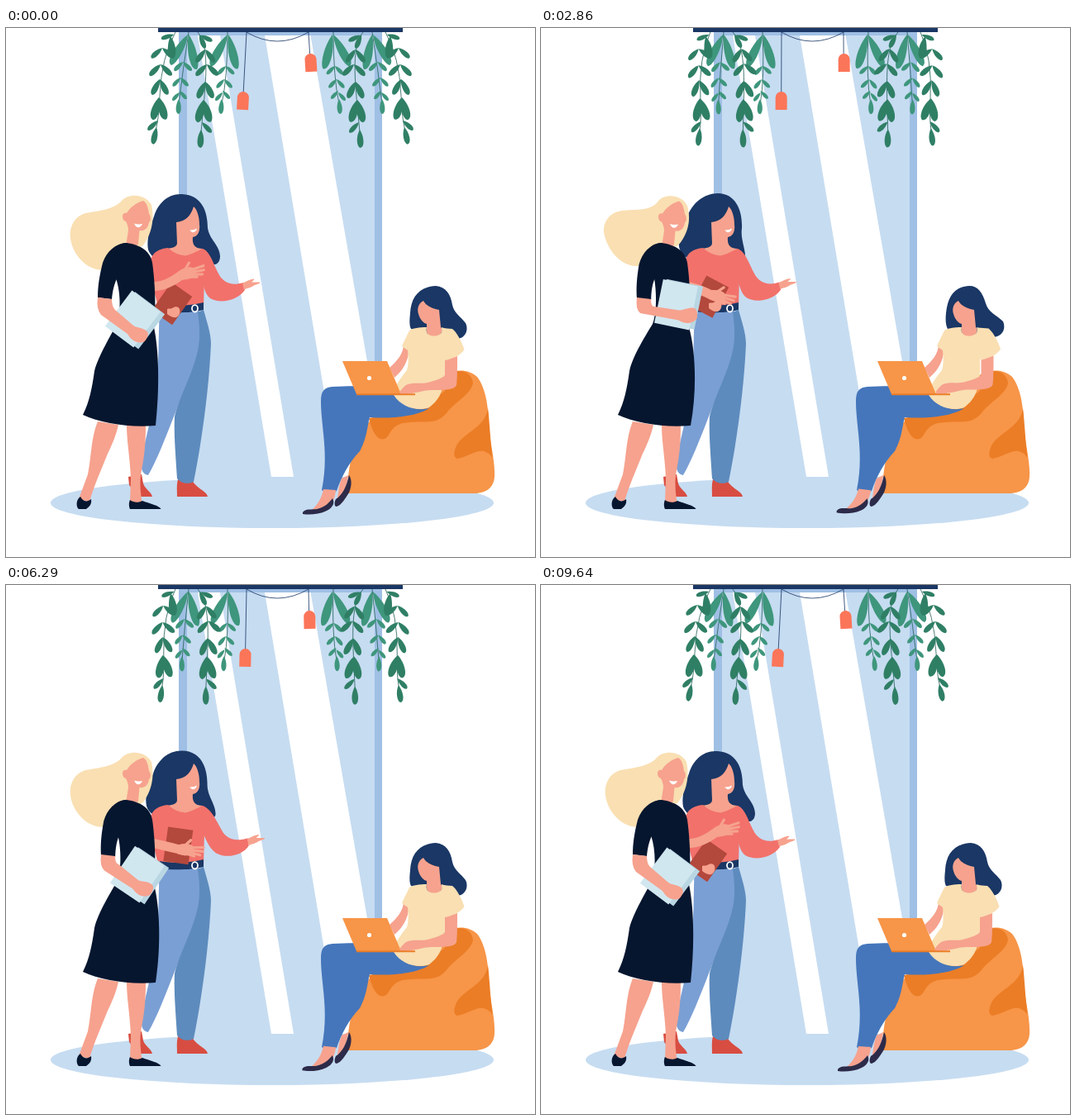
Animation, 640 px wide and 640 px high, one loop 9.71 s. Source, as an HTML page:

```html
<!DOCTYPE html>
<html lang="en">
<head>
<meta charset="utf-8">
<title>Office talk</title>
<style>
html, body { margin: 0; width: 100%; height: 100%; overflow: hidden; background: #fff; }
svg { display: block; width: 100%; height: 100%; }
.skin { fill: #f6a28e; }
.navy { fill: #1a3765; }
.dark { fill: #06162f; }
.cream { fill: #f9dfb2; }
.coral { fill: #f2716b; }
.orange { fill: #f79548; }
.amber { fill: #eb7d26; }
.red { fill: #d84d41; }
.cord { fill: none; stroke: #1a3765; stroke-width: .8; }
.fingers { fill: none; stroke: #f6a28e; stroke-width: 3.2; stroke-linecap: round; }
</style>
</head>
<body>
<svg viewBox="0 0 640 640">
  <ellipse cx="322" cy="574.5" rx="268" ry="30.5" fill="#c6dcf1"/>

  <!-- window -->
  <path fill="#9fbfe4" d="M209 5H455V543H209Z"/>
  <path fill="#c6dcf1" d="M219 9H446V546H219Z"/>
  <path fill="#fff" d="M232 9H259L348 543H321ZM313 9H368.500L446 455V543H402Z"/>

  <!-- hanging decor -->
  <path class="cord" d="M291 5Q328 27 366 5"/>
  <g id="tagA"><path class="cord" d="M291 5V78"/><path fill="#fb7559" d="M284 99V84A7 7 0 0 1 298 84V99Z"/></g>
  <g id="tagB"><path class="cord" d="M366 5V32"/><path fill="#fb7559" d="M359.500 53V38A7 7 0 0 1 373.500 38V53Z"/></g>
  <g class="vines"></g>
  <g class="vines" transform="matrix(-1 0 0 1 664 0)"></g>
  <path class="navy" d="M184 0H480V5H184Z"/>

  <!-- guide -->
  <path class="navy" id="guideHair"/>
  <path class="red" d="M164 540L166 551C168 558 176 561 177 567H160L149 553L148 543Z"/>
  <path class="red" d="M208 546C206 553 207 560 207 567H244C243 560 231 558 225 547Z"/>
  <path fill="#7a9fd4" d="M186 340L236 343C239 375 234 400 222 425C207 455 190 510 172 541C166 540 162 535 164 520L180 450C186 410 184 370 186 340Z"/>
  <path fill="#5d8bbd" d="M232 344L239 341C243 355 248 370 248 382C246 430 238 495 227 549C219 553 211 550 207 545C205 515 203 490 204 470C210 445 228 415 233 385C235 370 234 358 232 344Z"/>
  <path class="skin" d="M227 216C224 226 218 234 206 235L207 260C207 264 203 266 195 267C205 278 226 280 238 267C229 267 225 263 226 253C232 252 235 246 234 238C234 228 231 219 227 216Z"/>
  <path fill="#fff" d="M222 244.500Q227 245 231 242.500Q229.500 248 225 247Z"/>
  <path class="coral" d="M196 266C206 275 211 274 217 275.500C224 274 232 270 237 267C243 269 245 272 246 277L240 300L239 338H184L176 305L174 283C177 271 185 267 196 266Z"/>
  <path class="coral" id="guideSleeve"/>
  <path class="skin" id="guidePalm" d="M-1 -4C3 -5 6 -8 13 -9C14 -8 12 -7 10 -5L20 -5C22 -4 16 -2 13 -1C9 2 5 2 1 4Z"/>
  <path class="navy" d="M186 334C200 337 225 336 239 332V341C225 345 200 345 186 343Z"/>
  <ellipse cx="228.500" cy="339.300" rx="3.500" ry="4.200" fill="#1a3765" stroke="#fff" stroke-width="1.8"/>
  <path id="redBook" fill="#b3483c" d="M-15 0H15.500V42H-15Z"/>
  <path class="skin" id="grip" d="M-8 -4C-6 -5 -4 -4 -2 -5C2 -8 6 -7 7 -4C8 0 7 4 3 6C-2 7 -5 4 -8 2Z"/>
  <path id="guideArm" fill="none" stroke="#f6a28e" stroke-width="11"/>
  <g id="guideHand">
    <path class="skin" d="M-2 -5.500C6 -8 12 -8 16 -5L18 4C12 8 6 7 -2 5.500Z"/>
    <path class="fingers" d="M5 -4L13 -12M14 -3L29 -4M14 0L28 1M14 3L25 5.500M10 5L18 7"/>
  </g>

  <!-- visitor -->
  <path class="cream" id="visitorHair"/>
  <g id="visitorFace">
    <path class="skin" d="M166 209C158 211 150 217 146 224C140 222 139 232 145 234C147 238 148 241 148 245L145 264C150 268 158 267 160 261L161.500 245C168 246 172 242 173 235C176 233 175 226 173 225C172 217 170 211 166 209Z"/>
    <path fill="#fff" d="M155 236.500Q160 238 165 237Q163 242 158.500 241Q156 239.500 155 236.500Z"/>
  </g>
  <path class="skin" d="M111 476C103 495 103 520 99 540L88 570L101 573C106 555 115 535 123 515C129 503 134 490 136 480Z"/>
  <path class="skin" d="M146 480C146 500 150 520 151 545L150 574L165 576C163 565 161 550 164 535C168 515 169 500 169 480Z"/>
  <path class="dark" d="M90 567C84 571 85 580 88 582H97C101 579 104 576 103 570C98 574 93 573 90 567Z"/>
  <path class="dark" d="M150 571C148 575 149 580 150 582H187.500C186 578 173 575 165 572C160 575 154 574 150 571Z"/>
  <path class="dark" id="dress"/>
  <path class="dark" id="visitorSleeve" d="M146 260C132 261 122 270 117 284C113 300 111 312 111 326L128 328C129 318 131 308 136 300L152 278Z"/>
  <g id="files">
    <path fill="#b9d6e3" d="M-19 -28H26V25H-19Z"/>
    <path fill="#d1e7ef" d="M-23 -27H20V27H-23Z"/>
  </g>
  <path class="skin" id="visitorArm"/>
  <path class="skin" id="visitorHand" d="M-3 -6C4 -8 8 -12 14 -11C18 -10 19 -5 19 0C17 5 12 8 6 8C2 8 0 7 -3 6Z"/>

  <!-- seated worker -->
  <path class="orange" d="M414 563C412 540 418 510 430 490C445 460 490 440 530 420C545 412 560 413 570 422C581 436 584 462 584 480C586 505 592 525 591 543C590 557 580 563 566 563Z"/>
  <path class="amber" d="M439 472C442 485 448 498 456 497.500C466 496 462 483 480 478C510 474 522 482 536 462C550 448 562 442 565 430C564 417 552 413 543 416L530 440L500 460Z"/>
  <path class="amber" d="M583 460C580 485 550 490 544 508C541 515 542 520 546 521C555 520 570 510 578 512C584 514 587 517 588.500 520C586 500 585 475 583 460Z"/>
  <path class="navy" id="workerHair"/>
  <path class="skin" d="M481 384C480 395 473 403 464 411L470 423C480 414 486 405 488 388Z"/>
  <path class="skin" d="M505 330C499 333 497 340 499 346C501 353 505 357 509 358L509 364C508 370 512 374 519 374C526 373 530 366 526 362L524 341C516 340 508 336 505 330Z"/>
  <path class="cream" d="M509 362C500 362 492 363 488 366C484 374 481 380 479 385L486 390C487 400 487 408 485 414C476 425 470 435 466 444C476 460 500 464 512 459C528 448 532 430 531 402L544 368L527 362C530 370 523 373 517 372.500C509 372 508 368 509 362Z"/>
  <path fill="#4576bb" d="M469 444C460 433 430 432 395 434C384 435 381 440 381 452C381 482 391 515 382 559C387 563 395 563 400 560C405 545 415 525 428 512C437 495 437 482 440 471C465 473 498 470 512 460C495 464 478 458 469 444Z"/>
  <path class="skin" d="M406 545L414 541C413 552 409 562 404 570L400 574C402 565 402 555 406 545Z"/>
  <path fill="#2c2b49" d="M415 541C418 545 419 553 415 562C410 570 406 577 400 579C397 579 397 574 399 570C407 565 412 555 415 541Z"/>
  <g id="foot">
    <path class="skin" d="M384 558L399 559C398 570 394 577 390 579L369 584C378 576 382 568 384 558Z"/>
    <path fill="#2c2b49" d="M359 586C362 581 370 583 376 582C386 580 391 574 395 569C398 574 396 580 388 584C378 589 366 589 359 588Z"/>
  </g>
  <path class="orange" d="M407 403H461L478 443H424Z"/>
  <circle cx="439.500" cy="423.500" r="2.600" fill="#fff"/>
  <g id="workerArm">
    <path class="skin" d="M531 400L546 397C546 412 546 425 545 432C543 438 530 438 515 438C505 438 495 443 478 443C474 442 478 437 484 432C492 428 500 431 510 429C520 426 528 424 531 420Z"/>
    <path class="cream" d="M527 363L540 364C546 369 551 379 554.500 389C550 396 541 400 531 402Z"/>
  </g>
  <path class="amber" d="M424 442.300H495V444.300H424Z"/>
</svg>
<script>
const LOOP = 9710;
const KEYS = [0, 1430, 2860, 4860, 6290, 7290];
const $ = id => document.getElementById(id);
const set = (id, d) => $(id).setAttribute('d', d);
const move = (id, x, y, a = 0) =>
  $(id).setAttribute('transform', `translate(${x} ${y}) rotate(${a})`);
const spin = (el, a, x, y) => el.setAttribute('transform', `rotate(${a} ${x} ${y})`);

// Periodic monotone curve through one value per key time.
function track(...v) {
  const n = KEYS.length;
  const time = i => KEYS[(i + n) % n] + LOOP * Math.floor(i / n);
  const val = i => v[(i + n) % n];
  const rate = i => (val(i + 1) - val(i)) / (time(i + 1) - time(i));
  const slope = i => {
    const a = rate(i - 1), b = rate(i);
    return a * b > 0 ? 2 * a * b / (a + b) : 0;
  };
  return t => {
    let i = n - 1;
    while (KEYS[i] > t) i--;
    const h = time(i + 1) - time(i), u = (t - time(i)) / h;
    const s = u * u * (3 - 2 * u);
    return val(i) * (1 - s) + val(i + 1) * s +
      h * u * (1 - u) * (slope(i) * (1 - u) - slope(i + 1) * u);
  };
}

// Blend two paths of equal structure.
function blend(a, b) {
  const num = /-?\d+(\.\d+)?/g, to = b.match(num).map(Number);
  return k => {
    let i = 0;
    return a.replace(num, x => (+x + (to[i++] - x) * k).toFixed(2));
  };
}

// Vines: nodes are drooping pairs [x, y, length, spread], leaves are [x, y, length, angle].
const DARK = '#2f7f65', LIGHT = '#3e967c';
const VINES = [
  { x: 221, sway: 4, color: LIGHT, stem: 'M221 5Q214 50 209 92',
    nodes: [[214, 41, 15, 45], [211, 60, 14, 42]],
    leaves: [[220, 8, 42, 121], [221, 8, 43, 79], [210, 78, 13, 132], [210, 76, 13, 50], [209, 86, 18, 92]] },
  { x: 268, sway: 3, color: LIGHT, stem: 'M268 5Q268 60 261 92',
    nodes: [[266, 46, 14, 45], [264, 62, 14, 42]],
    leaves: [[268, 8, 43, 119], [269, 8, 43, 77], [262, 78, 13, 132], [262, 76, 13, 48], [261, 86, 18, 94]] },
  { x: 204, sway: 5.5, color: DARK, stem: 'M205 5Q188 35 186 82Q185 110 181 124',
    nodes: [[189, 24, 18, 48], [187, 44, 19, 45], [186, 62, 21, 27], [185, 84, 28, 16]],
    leaves: [[203, 8, 16, 163], [199, 10, 27, 85], [184, 112, 17, 138], [182, 120, 21, 102]] },
  { x: 232, sway: 4.3, color: DARK, stem: 'M232 5C248 25 241 70 236 126',
    nodes: [[241, 26, 19, 36], [243, 44, 19, 45], [241, 65, 22, 25], [239, 87, 28, 16]],
    leaves: [[234, 8, 18, 68], [235, 9, 16, 25], [237, 114, 17, 48], [236, 123, 22, 93]] }
];

function leaf([x, y, len, angle]) {
  const w = len > 35 ? .16 : .23;
  const p = (a, b) => `${(a * len).toFixed(1)} ${(b * len).toFixed(1)}`;
  return `<path transform="translate(${x} ${y}) rotate(${angle})" d="M0 0C${p(.35, -w)} ${p(.9, -w)} ${p(1, -.04)}C${p(1, w)} ${p(.4, w)} 0 0Z"/>`;
}

function vine(v) {
  const pairs = v.nodes.flatMap(([x, y, len, s]) => [[x, y, len, 90 + s], [x, y, len, 90 - s]]);
  return `<g fill="${v.color}"><path d="${v.stem}" fill="none" stroke="#245f58" stroke-width=".8"/>` +
    pairs.concat(v.leaves).map(leaf).join('') + '</g>';
}

const groups = [...document.querySelectorAll('.vines')];
groups.forEach(g => g.innerHTML = VINES.map(vine).join(''));

const shapes = {
  guideHair: blend(
    'M213 201C196 200 184 212 179 228C173 243 170 258 172 268C174 274 178 278 184 279L236 270C243 289 259 291 259 276C258 262 246 256 244 242C244 222 237 202 213 201Z',
    'M214 200C197 200 183 212 177 228C170 242 164 257 168 268C171 276 176 279 184 279L236 268C242 272 246 277 247 279C248 268 241 256 243 242C244 222 236 200 214 200Z'),
  guideSleeve: blend(
    'M238 267C248 272 250 284 257 297C262 307 272 313 287 308L289 317C280 330 259 334 247 327C240 322 239 310 236 300Z',
    'M238 267C250 272 256 284 264 297C269 306 280 310 296 305L297 314C290 326 270 330 258 322C248 314 243 305 236 290Z'),
  visitorHair: blend(
    'M176 214C168 200 148 200 140 209C130 220 112 221 96 224C82 228 76 242 78 255C81 275 98 294 120 293C130 292 140 280 146 270L165 264C176 250 180 232 176 214Z',
    'M177 215C170 201 150 200 142 209C134 222 114 219 98 221C82 223 75 236 76 247C78 262 92 287 115 288C132 288 140 275 148 268L165 264C178 250 182 232 177 215Z'),
  dress: blend(
    'M146 260C162 262 175 270 177 284C180 305 182 340 179 362C185 390 186 435 181 481C150 484 115 478 93 468C101 452 104 436 107 415C112 396 128 370 134 358C139 345 139 320 133 303L124 280C128 264 138 260 146 260Z',
    'M146 260C162 262 175 270 177 284C180 305 182 340 179 362C187 390 189 438 181 481C150 484 115 478 93 468C101 452 104 436 107 415C111 396 128 370 135 358C140 345 140 320 137 303L126 280C128 264 138 260 146 260Z'),
  workerHair: blend(
    'M520 312C500 313 490 325 489 345C488 355 488 360 490 364L520 374L546 376C556 375 560 365 556 357C550 349 542 345 540 335C538 322 532 313 520 312Z',
    'M518 312C500 313 492 325 490 345C489 355 490 360 492 364L520 372L546 374C558 374 563 364 559 355C551 347 541 344 538 333C534 320 529 312 518 312Z')
};

const pose = {
  guideHair: track(0, .12, 1, 1, .45, 1),
  reach: track(0, 0, .15, 1, .6, .06),
  redX: track(212.5, 212, 213.5, 206, 211, 212.5),
  redY: track(316, 312.5, 306.5, 287.5, 294.5, 311.5),
  redTurn: track(35, 36, 28, -12, 8, 37),
  gripX: track(203, 204, 211, 223, 215, 205),
  gripY: track(344, 344, 337, 313, 321, 343),
  wristX: track(212, 208, 206, 206, 210, 212),
  wristY: track(299, 314, 323, 324, 320, 309),
  handTurn: track(-15, -8, 12, 10, 3, -8),
  visitorHair: track(0, 1, 1, 1, 0, 0),
  sleeve: track(0, 1.5, 5, 5, 4, 0),
  filesX: track(154.5, 158, 165, 164.5, 160, 154.5),
  filesY: track(353, 350, 335, 345, 351, 353),
  filesTurn: track(37, 35, 11.5, 25, 34, 37),
  armX: track(153, 157, 170, 165, 159, 153),
  armY: track(367, 364, 348, 358, 364, 367),
  dress: track(0, .7, 1, .4, .6, .8),
  workerHair: track(0, .35, 1, 1, 0, 0),
  workerArm: track(0, 1, 1, 1, 0, 0),
  foot: track(0, 2.7, 3, 3, 1.2, .4)
};

function drawVisitorArm(p) {
  const ex = p.sleeve, dx = p.armX - 122 - ex, dy = p.armY - 342;
  const len = Math.hypot(dx, dy), nx = -dy / len * 6, ny = dx / len * 6;
  const inner = `${132 + ex} ${341 - ex * .8}`, outer = `${115 + ex} ${347 - ex * .4}`;
  set('visitorArm', `M${111 + ex} 326L${128 + ex} 328Q${128 + ex} 337 ${inner}` +
    `L${p.armX - nx} ${p.armY - ny}L${p.armX + nx} ${p.armY + ny}L${outer}` +
    `Q${109 + ex} 340 ${111 + ex} 326Z`);
  move('visitorHand', p.armX, p.armY, Math.atan2(dy, dx) * 180 / Math.PI);
}

function draw(t) {
  const p = {};
  for (const k in pose) p[k] = pose[k](t);
  for (const k in shapes) set(k, shapes[k](k === 'guideSleeve' ? p.reach : p[k]));

  // two sways per loop
  const lean = (1 + Math.cos(4 * Math.PI * t / LOOP)) / 2;
  for (const g of groups)
    VINES.forEach((v, i) => spin(g.children[i], -v.sway * (1 - lean), v.x, 5));
  spin($('tagA'), 3 * lean, 291, 5);
  spin($('tagB'), -3.5 * lean, 366, 5);

  move('guidePalm', 287 + 9.5 * p.reach, 312.5 - 2.5 * p.reach);
  move('redBook', p.redX, p.redY, p.redTurn);
  move('grip', p.gripX, p.gripY);
  set('guideArm', `M176 312Q190 315 ${p.wristX} ${p.wristY}`);
  move('guideHand', p.wristX, p.wristY, p.handTurn);

  move('visitorFace', p.visitorHair, p.visitorHair * .5);
  spin($('visitorSleeve'), -p.sleeve * .95, 142, 266);
  move('files', p.filesX, p.filesY, p.filesTurn);
  drawVisitorArm(p);

  move('workerArm', 1.5 * p.workerArm, -.4 * p.workerArm);
  spin($('foot'), p.foot, 392, 560);
}

function tick() {
  draw(performance.now() % LOOP);
  requestAnimationFrame(tick);
}
tick();
</script>
</body>
</html>
```
